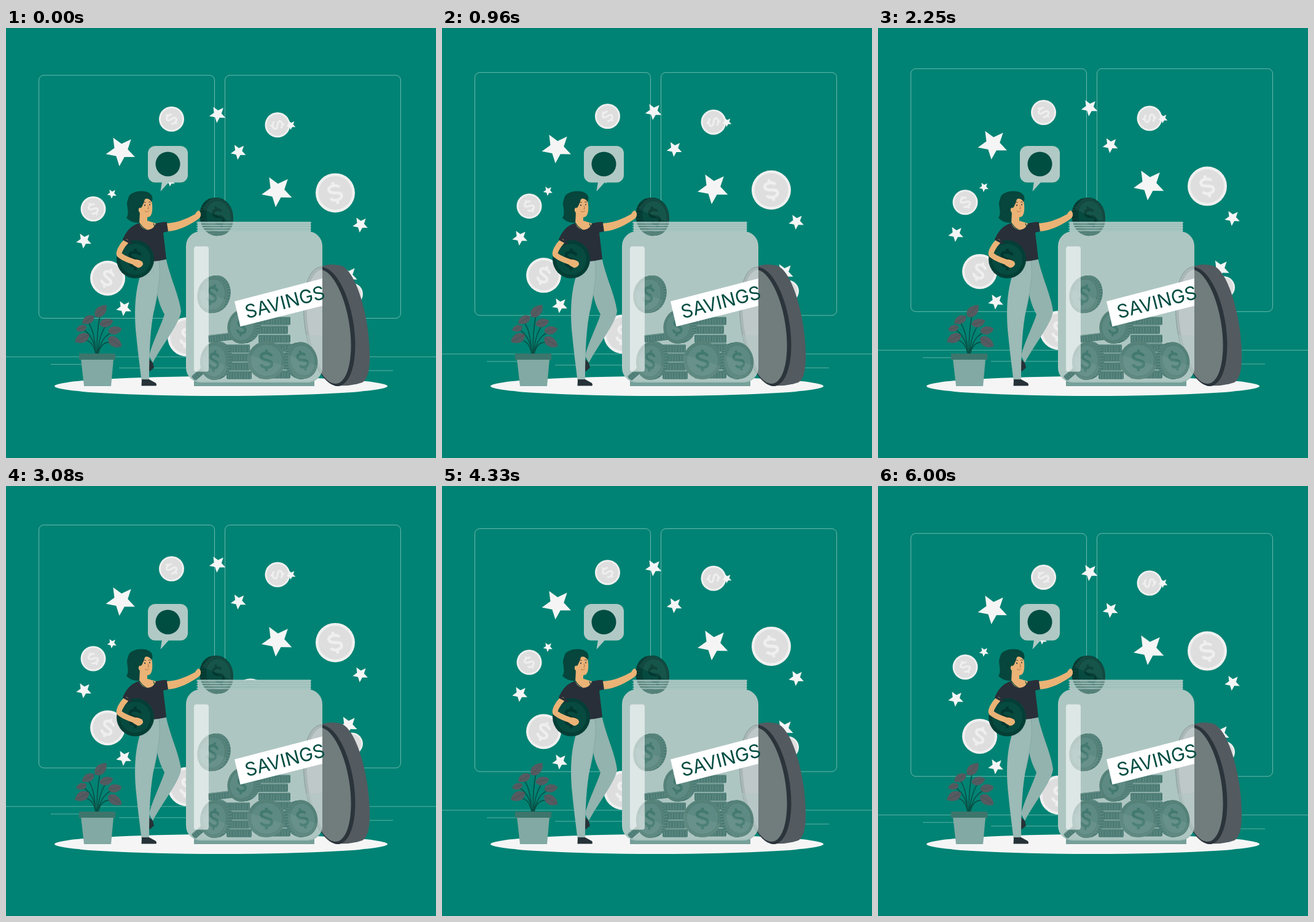
An HTML page with a canvas for the animation above (6.04 s loop, 700 px wide and 700 px high).

```html
<!DOCTYPE html>
<html lang="en">
<head>
<meta charset="utf-8">
<title>Savings jar</title>
<style>
html, body { margin: 0; width: 100%; height: 100%; overflow: hidden; background: #008374; }
canvas { display: block; width: 700px; height: 700px; }
</style>
</head>
<body>
<canvas id="stage" width="700" height="700"></canvas>
<script>
const c = document.getElementById('stage').getContext('2d');
const LOOP = 6040, RISE = 14.5, LEAD = 70;
const SKIN = '#ebb376', DARK = '#263238', DEEP = '#004d42', WHITE = '#f5f5f5';

function shape(d, fill, stroke, width = 1) {
  const p = new Path2D(d);
  if (fill) { c.fillStyle = fill; c.fill(p); }
  if (stroke) { c.strokeStyle = stroke; c.lineWidth = width; c.stroke(p); }
}
function oval(x, y, rx, ry, fill, rot = 0, stroke, width = 1) {
  c.beginPath();
  c.ellipse(x, y, rx, ry, rot, 0, Math.PI * 2);
  if (fill) { c.fillStyle = fill; c.fill(); }
  if (stroke) { c.strokeStyle = stroke; c.lineWidth = width; c.stroke(); }
}
function box(x, y, w, h, r, fill, stroke) {
  c.beginPath();
  c.roundRect(x, y, w, h, r);
  if (fill) { c.fillStyle = fill; c.fill(); }
  if (stroke) { c.strokeStyle = stroke; c.lineWidth = 1; c.stroke(); }
}
function rule(x1, x2, y) {
  c.beginPath();
  c.moveTo(x1, y);
  c.lineTo(x2, y);
  c.lineWidth = 1;
  c.stroke();
}
function star(x, y, r) {
  c.beginPath();
  for (let i = 0; i < 10; i++) {
    const a = -2.1 + i * Math.PI / 5, k = i % 2 ? r * 0.46 : r;
    c.lineTo(x + k * Math.cos(a), y + k * Math.sin(a));
  }
  c.fillStyle = WHITE;
  c.fill();
}
function dollar(x, y, rx, ry, rot, ink) {
  c.save();
  c.translate(x, y);
  c.rotate(rot);
  c.scale(rx, ry);
  shape('M.27 -.22C.2 -.42 -.3 -.44 -.28 -.2C-.26 .06 .3 -.06 .28 .2C.26 .45 -.24 .42 -.28 .21' +
    'M0 -.56V-.35M0 .36V.57', null, ink, 0.15);
  c.restore();
}
function paleCoin(x, y, r, rot) {
  oval(x, y, r, r, '#f0f0f0');
  oval(x, y, r * 0.86, r * 0.86, '#dedede');
  dollar(x, y, r, r, rot, '#efefef');
}

const greens = { edge: '#06372f', rib: '#0b5145', face: '#043f36', inner: '#074a3f', ink: '#00372e' };
const faded = { edge: '#4b7b74', rib: '#6c958f', face: '#568279', inner: '#5d8a83', ink: '#427970' };

// Tilted coin whose ribbed edge shows towards (dx, dy)
function coin(x, y, rx, ry, tilt, dx, dy, turn, tone) {
  const n = Math.ceil(Math.hypot(dx, dy));
  for (let i = n; i > 0; i--) oval(x + dx * i / n, y + dy * i / n, rx, ry, tone.edge, tilt);
  if (n) {
    const mid = Math.atan2(dy, dx) - tilt;
    c.beginPath();
    for (let a = mid - 1.2; a < mid + 1.2; a += 0.16) {
      const u = rx * Math.cos(a), v = ry * Math.sin(a);
      const px = x + u * Math.cos(tilt) - v * Math.sin(tilt);
      const py = y + u * Math.sin(tilt) + v * Math.cos(tilt);
      c.moveTo(px, py);
      c.lineTo(px + dx * 0.9, py + dy * 0.9);
    }
    c.strokeStyle = tone.rib;
    c.lineWidth = 1;
    c.stroke();
  }
  oval(x, y, rx, ry, tone.face, tilt);
  oval(x, y, rx * 0.84, ry * 0.84, tone.inner, tilt, tone.edge, 0.8);
  dollar(x, y, rx, ry, turn, tone.ink);
}
function slab(x, y, w, h) {
  box(x, y, w, h, 2, faded.edge);
  c.beginPath();
  for (let i = 3; i < w; i += 4 + (i % 3)) {
    c.moveTo(x + i, y + 3);
    c.lineTo(x + i, y + h - 1);
  }
  c.strokeStyle = '#628c85';
  c.lineWidth = 1.3;
  c.stroke();
  c.fillStyle = '#6a948d';
  c.fillRect(x + 1, y, w - 2, 1.5);
}
function tilted(x, y, rot, draw) {
  c.save();
  c.translate(x, y);
  c.rotate(rot);
  draw();
  c.restore();
}

function scenery(y) {
  c.save();
  c.translate(0, y);
  const line = 'rgba(255,255,255,.42)';
  box(53.5, 77, 286, 395.5, 8, null, line);
  box(356.5, 77, 286, 395.5, 8, null, line);
  c.strokeStyle = 'rgba(255,255,255,.36)';
  rule(0, 700, 535.3);
  rule(73, 123, 547.5);
  rule(184, 295, 553.4);
  rule(585, 630, 557.8);
  paleCoin(269.5, 148.3, 20.5, -0.85);
  paleCoin(442, 157.8, 20.5, 1.45);
  paleCoin(536, 268.4, 32, -0.25);
  paleCoin(142, 294.5, 20.5, -0.6);
  paleCoin(165.5, 407.2, 28.5, 0.4);
  paleCoin(295, 503, 32, 0.25);
  paleCoin(563, 433, 18, 0.2);
  paleCoin(398, 354, 27, 0);
  [[187, 200, 25], [441.5, 265.5, 26], [344.5, 140.5, 14], [378.5, 201.5, 13],
   [577, 320, 13], [464, 158, 8], [172.5, 269.8, 8], [127, 346, 13],
   [192, 456, 13], [557, 403, 16], [267.5, 250, 8]].forEach(s => star(...s));
  c.restore();
}

function plant() {
  shape('M148 530C148 505 150 480 154 464M146 530C145 505 140 486 132 477M147 530C144 510 136 495 122 489' +
    'M146 530C143 514 136 508 124 507M149 530C151 508 156 492 164 483M149 530C155 508 162 499 176 494' +
    'M150 530C154 514 162 510 174 512', null, '#0a4f44', 1.6);
  const leaf = (x, y, s, a) => tilted(x, y, a, () => {
    c.scale(s, s);
    shape('M-12 1C-9 -9 4 -10 13 -1C7 9 -6 11 -12 1Z', '#555b60');
    shape('M-11 1L11 -1', null, '#454d51', 0.7);
  });
  leaf(154, 461, 1.05, -0.75);
  leaf(134, 475, 0.9, 2.7);
  leaf(123, 489, 0.72, 2.9);
  leaf(124, 505, 1.02, 2.75);
  leaf(163, 480, 0.92, -0.2);
  leaf(177, 492, 0.9, -0.1);
  leaf(177, 511, 1.05, 0.65);
  shape('M122 539H175L171 583H127Z', '#82a9a3');
  c.fillStyle = '#3d756c';
  c.fillRect(119, 530, 59, 10);
}

function bubble() {
  box(231, 192, 65, 59.5, 12, '#b0c9c5');
  shape('M254 250L251.500 266L266 250Z', '#b0c9c5');
  oval(263.5, 221.5, 20, 20, DEEP);
}

function woman() {
  // legs and shoes
  shape('M233 539L239 545L241 553L234 559L232 557Z', DARK);
  shape('M240 379L261 377C266 403 282 436 285 461C283 481 254 516 239 545L233 534C237 515 254 481 258 466C249 450 243 430 244 400Z', '#93b3ae');
  shape('M221 396C208 430 209 470 212 500C215 530 218 552 220.500 573H233C233 540 234 500 239 470C245 440 254 410 249 378L228 378Z', '#9cbab6');
  shape('M249 378C253 405 247 430 241 460', null, '#7fa49e', 0.8);
  shape('M221 572H233L244 578Q246 582 244 582.500H220.500Z', DARK);

  // hair and head
  shape('M200 274C205 266 222 263 232 268C238 271 240 277 237 283L226 300C221 306 221 312 224 316C213 319 202 316 196 309C201 303 197 294 197 284Z', '#06463c');
  shape('M218 298L230 303V317L242 319C238 329 224 330 217 319Z', SKIN);
  shape('M221 280C226 275 235 276 237 281C239 291 239 303 234 307C228 310 219 306 217 299C214 293 218 285 221 280Z', SKIN);
  shape('M205 275C215 265 231 265 236 271C239 275 239 280 237 283C233 277 228 277 226 279C223 289 220 294 216 297L208 292Z', '#06463c');
  oval(218.5, 296, 2.7, 3.6, SKIN);
  oval(226, 288.5, 0.9, 1.3, DARK);
  oval(234, 287.5, 0.8, 1.2, DARK);
  shape('M223 285Q225 282.500 228 284M232 283.500Q234 282 236 284', null, DARK, 0.8);
  shape('M231 289L232.500 294L230 294.500M226 298Q230 301 233 297', null, '#a56742', 0.8);

  // top
  shape('M216 318C207 320 197 328 191 342L206 351L213 348L215 378C229 381 247 381 261 376L256 333L264 331L262 316C257 315 251 317 244 318Z', '#282f38');
  shape('M217 317C220 330 238 334 244 318L231 314Z', SKIN);
  shape('M217 317C220 322 224 326 228 328M240 318L242 323', null, '#0c5146', 1.3);
}

function reach() {
  shape('M262 318C280 317 295 310 308 303C310 299 313 296 315 298C319 302 317 309 313 311C300 320 282 330 264 331Z', SKIN);
}

function heldCoin() {
  coin(210.5, 376.5, 30.5, 31, 0, 0, 0, 0, greens);
  c.save();
  c.lineCap = c.lineJoin = 'round';
  shape('M195 348C188 355 183 365 184.500 369C190 375 203 379 214 383', null, SKIN, 9);
  c.restore();
  shape('M209 377C216 376 224 380 223 385C221 389 217 391 214 390L207 386Z', SKIN);
  shape('M191 341L206 350L203 352L190 345Z', '#282f38');
}

const LID_TILT = -0.16;
function lid() {
  oval(527, 486, 38, 98, '#2b343b', LID_TILT);
  shape('M511 389C524 383 537 385 546 387C570 396 592 470 592 535C592 560 588 572 580 577C568 581 555 583 543 582Z', '#535a60');
  oval(526.5, 486, 39.500, 98, '#2b343b', LID_TILT);
  oval(523.5, 486, 35.5, 94, '#717c7d', LID_TILT);
}

function jarCoins() {
  for (let i = 0; i < 7; i++) slab(411 + (i % 3 === 1 ? -4 : i % 2), 470 + i * 14.5, 52, 13.5);
  for (let i = 0; i < 4; i++) slab(356 + (i % 2) * 3, 515 + i * 14.4, 41, 13.6);
  tilted(349, 504, -0.12, () => slab(-20, -6, 41, 12));
  tilted(314, 563, -0.72, () => slab(-12, -5, 24, 10));
  coin(384, 486, 23.5, 28, 0.2, 7, -1, 0.15, faded);
  coin(336, 434, 24.5, 30.5, 0.2, 5, -1, 0.25, faded);
  coin(339, 542, 23, 31, 0.1, 6, -1, 0.1, faded);
  coin(424, 541, 31, 31, 0, 0, 0, 0, faded);
  coin(483, 541, 24, 30, -0.25, -6, 1, -0.3, faded);
  // soft sheen across the faces
  c.fillStyle = 'rgba(255,255,255,.06)';
  [[424, 541, 31, 31], [336, 434, 24, 30], [339, 542, 23, 31], [483, 541, 24, 30]].forEach(([x, y, a, b]) => {
    c.beginPath();
    c.ellipse(x, y, a, b, 0, 0.3, 0.3 + Math.PI);
    c.fill();
  });
}

function jar() {
  c.fillStyle = '#76a09a';
  c.fillRect(306, 570, 196, 13);
  shape('M312 316H496V332H312Z', '#9dbfba');
  box(293, 331, 222, 246, 24, '#aec6c2');

  // lid behind the glass
  c.save();
  c.beginPath();
  c.roundRect(293, 331, 222, 246, 24);
  c.clip();
  oval(526.5, 486, 39.500, 98, '#aab7b7', LID_TILT, '#879b99', 1);
  oval(529, 486, 37, 94, '#bfc8c9', LID_TILT);
  shape('M484 500H515V577H500Z', 'rgba(174,198,194,.45)');
  c.restore();

  jarCoins();
  box(306, 355.5, 24, 204, 4, 'rgba(255,255,255,.58)');
  shape('M301 569Q306 575 315 575.500H493Q504 575 509 567', null, '#a1beb9', 1.5);
}

function neck() {
  // part of the dropped coin seen through glass
  c.save();
  c.beginPath();
  c.rect(300, 316, 210, 30);
  c.clip();
  coin(346, 307, 24, 31, -0.18, -6.5, 0.5, -0.3, faded);
  c.restore();
  c.globalAlpha = 0.75;
  box(310, 315.3, 187, 3, 1.5, '#b0cac6');
  box(310, 320.3, 187, 2, 1, '#b0cac6');
  box(310, 324.3, 187, 2, 1, '#b0cac6');
  box(310, 328.5, 187, 2, 1, '#b0cac6');
  c.globalAlpha = 1;
}

function label() {
  c.save();
  c.beginPath();
  c.rect(360, 395, 155, 100);
  c.clip();
  shape('M372 445L516 407.500V452L381.500 486Z', '#fff');
  c.restore();
  tilted(453.7, 446, -0.252, () => {
    c.font = '400 30.5px Inter, "Open Sans", sans-serif';
    c.textAlign = 'center';
    c.textBaseline = 'alphabetic';
    c.fillStyle = DEEP;
    c.fillText('SAVINGS', 0, 11);
  });
}

function render(t) {
  const p = ((t + LEAD) % LOOP) / LOOP;
  const lift = 1 - Math.abs(1 - 2 * p);
  c.fillStyle = '#008374';
  c.fillRect(0, 0, 700, 700);
  scenery(0.35 - RISE * lift);
  oval(350, 583, 271, 16, WHITE);
  plant();
  bubble();
  lid();
  woman();
  heldCoin();
  coin(346, 307, 24, 31, -0.18, -6.5, 0.5, -0.3, greens);
  shape('M319 294L371 318Q374 298 358 283Q345 273 334 277Z', 'rgba(255,255,255,.06)');
  reach();
  jar();
  neck();
  label();
}

const start = performance.now();
function tick() {
  render((performance.now() - start) % LOOP);
  requestAnimationFrame(tick);
}
tick();
</script>
</body>
</html>
```
